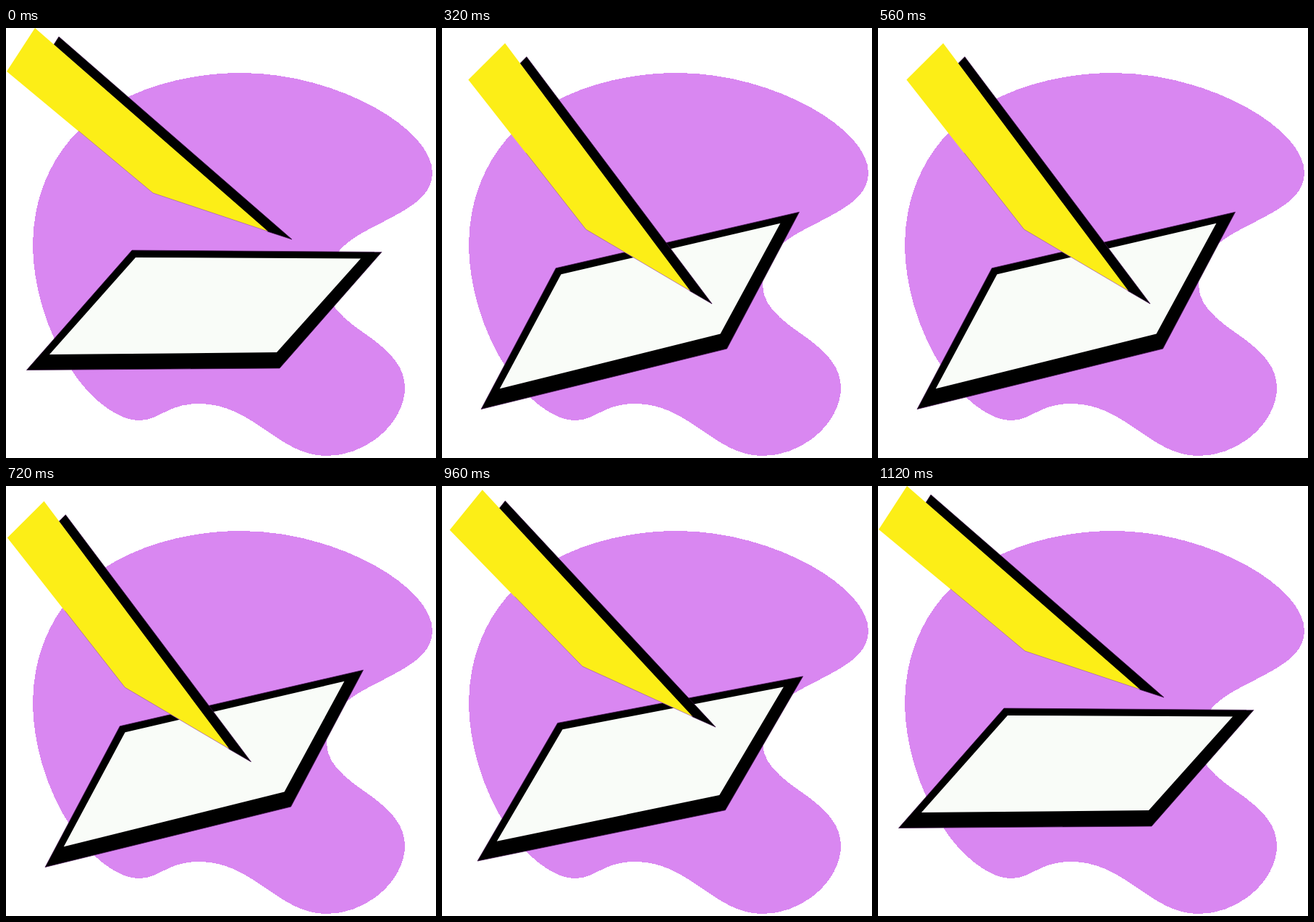
These frames come from a looping animation (594x594 px, 1.2 s). An HTML page:

```html
<!DOCTYPE html>
<html lang="en">
<head>
<meta charset="utf-8">
<title>Pencil and tablet</title>
<style>
  html, body { margin: 0; height: 100%; overflow: hidden; background: #fff; }
  svg { display: block; width: 100%; height: 100%; }
  .edge { stroke: #3d0d4a; stroke-width: .7; }
</style>
</head>
<body>
<svg viewBox="0 0 594 594">
  <path fill="#d987f1" shape-rendering="crispEdges" d="M325 62C455 62 589 138 589 200
    C589 242 535 258 487 286C462 301 443 322 443 356C443 390 484 413 508 431
    C533 450 551 470 551 497C551 544 500 591 443 591C376 591 342 519 267 519
    C222 519 213 542 184 542C150 542 111 505 91 473C55 420 37 352 37 300
    C37 246 55 187 100 142C155 87 245 62 325 62Z"/>
  <g id="tablet">
    <path class="edge" d="M174 307L519 309.5L378 470L28.5 472.5Z"/>
    <path fill="#f9fcf8" d="M179 317L490 318.5L374 448L60 451Z"/>
  </g>
  <!-- drawn with the tip at the origin -->
  <g id="pencil">
    <path class="edge" d="M-322 -280L0 0L-34 -11L-329 -269Z"/>
    <path fill="#fcee17" d="M-355 -292L-394 -232L-192 -64L-33 -11Z"/>
    <path fill="none" stroke="#a55bb0" stroke-width=".7" d="M-295 -150L-192 -64L-33 -11"/>
  </g>
</svg>
<script>
  const STEP = 80, LAST = 14;  // the steps run forwards, then back again
  const LOWER = 4;             // steps until the pencil touches the tablet
  const tablet = document.getElementById('tablet');
  const pencil = document.getElementById('pencil');

  function draw(now) {
    const i = Math.floor(now / STEP) % (LAST + 1);
    const step = Math.min(i, LAST - i);
    const u = Math.min(step / LOWER, 1);

    // after touching down, jump left and stroke evenly to the right
    const stroke = step > LOWER ? -53.25 + 18.75 * (step - LOWER) : 0;
    const x = 395 - 46 * u + 24 * u * u + stroke;
    const y = 292 + 75 * u + 14 * u * u;
    const tilt = -13.4 * (1 - (1 - u) ** 2.6);

    pencil.setAttribute('transform', `translate(${x} ${y}) rotate(${12.1 * u})`);
    tablet.setAttribute('transform', `rotate(${tilt} 271.2 390.5)`);
  }

  const start = performance.now();
  function tick() {
    draw(performance.now() - start);
    requestAnimationFrame(tick);
  }
  tick();
</script>
</body>
</html>
```
